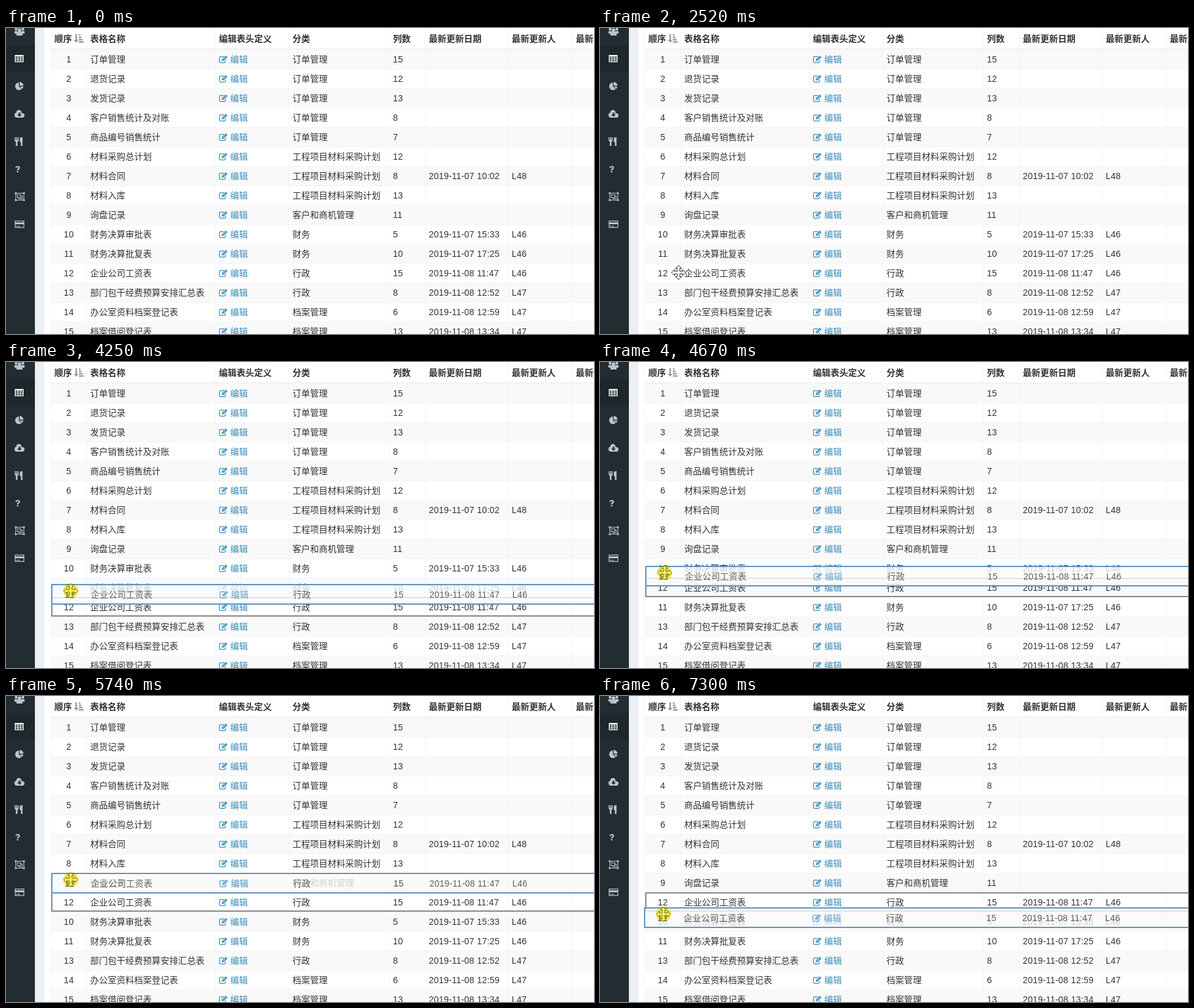
Animation of 936 by 488 pixels, one loop 8 s. Source, as an HTML page with a canvas:

```html
<!DOCTYPE html>
<html lang="zh">
<head>
<meta charset="utf-8">
<style>
html, body { margin: 0; width: 100%; height: 100%; overflow: hidden; background: #fff; }
canvas { display: block; }
</style>
</head>
<body>
<canvas id="stage" width="936" height="488"></canvas>
<script>
const c = document.getElementById('stage').getContext('2d');
const FONT = '"Liberation Sans", "Noto Sans CJK SC", "Noto Sans CJK", sans-serif';
const LOOP = 8000, TOP = 34, ROW = 31;
const COLS = [71, 128, 333, 450, 610, 667, 799, 901];
const HEADS = ['顺序', '表格名称', '编辑表头定义', '分类', '列数', '最新更新日期', '最新更新人', '最新更新'];
const ROWS = `订单管理|订单管理|15
退货记录|订单管理|12
发货记录|订单管理|13
客户销售统计及对账|订单管理|8
商品编号销售统计|订单管理|7
材料采购总计划|工程项目材料采购计划|12
材料合同|工程项目材料采购计划|8|2019-11-07 10:02|L48
材料入库|工程项目材料采购计划|13
询盘记录|客户和商机管理|11
财务决算审批表|财务|5|2019-11-07 15:33|L46
财务决算批复表|财务|10|2019-11-07 17:25|L46
企业公司工资表|行政|15|2019-11-08 11:47|L46
部门包干经费预算安排汇总表|行政|8|2019-11-08 12:52|L47
办公室资料档案登记表|档案管理|6|2019-11-08 12:59|L47
档案借阅登记表|档案管理|13|2019-11-08 13:34|L47`
  .split('\n').map((line, i) => [String(i + 1), ...line.split('|')]);
const DRAGGED = 11;

// Pointer moves: start, end, steps, x, y, how far the dragged row lags
const MOVES = [
  [500, 500, 1, 831, 482], [580, 880, 5, 400, 325], [960, 1280, 5, 122, 390],
  [1360, 1440, 2, 105, 395], [1740, 1840, 2, 99, 389], [2440, 2520, 2, 125, 390],
  [2840, 2940, 2, 103, 392], [3550, 4250, 10, 103, 365], [4340, 4340, 1, 103, 359],
  [4430, 5060, 9, 103, 308], [5120, 5190, 2, 103, 301], [5290, 5290, 1, 103, 302],
  [5600, 5830, 4, 103, 284], [6280, 6460, 3, 103, 321, 8], [6540, 6680, 3, 103, 323],
  [7240, 7300, 2, 101, 348]
];

function pointerAt(t) {
  let x = 831, y = 482, lag = 0;
  for (const [a, b, n, tx, ty, tl = 0] of MOVES) {
    if (t < a) break;
    const k = Math.min(1, (1 + Math.floor((t - a) / (b - a || 1) * (n - 1))) / n);
    x += (tx - x) * k;
    y += (ty - y) * k;
    lag += (tl - lag) * k;
  }
  return { x: Math.round(x), y: Math.round(y), lag: Math.round(lag) };
}

function rect(color, x, y, w, h) {
  c.fillStyle = color;
  c.fillRect(x, y, w, h);
}

function text(s, x, y, color = '#333', weight = '', align = 'left') {
  c.font = `${weight} 14px ${FONT}`;
  c.letterSpacing = /^[ -~]+$/.test(s) ? '0.2px' : '0px';
  c.textAlign = align;
  c.fillStyle = color;
  c.fillText(s, x, y + 5);
}

function path(d, color, width) {
  const p = new Path2D(d);
  if (width) {
    c.strokeStyle = color;
    c.lineWidth = width;
    c.stroke(p);
  } else {
    c.fillStyle = color;
    c.fill(p);
  }
}

function at(x, y, draw) {
  c.save();
  c.translate(x, y);
  draw();
  c.restore();
}

function disc(x, y, r, color) {
  c.beginPath();
  c.arc(x, y, r, 0, 7);
  c.fillStyle = color;
  c.fill();
}

function editIcon(x, y) {
  at(x, y, () => {
    path('M8 -4.3H2.5Q.8 -4.3 .8 -2.5V3.5Q.8 5.3 2.5 5.3H8.5Q10.3 5.3 10.3 3.5V1.5', '#3c8dbc', 1.3);
    path('M4.5 2.5V0L10.8 -6L13.6 -3.3L7.2 2.5Z', '#3c8dbc');
    path('M6.3 .6L10.8 -3.6', '#fff', .8);
  });
}

function cells(row, dx, y) {
  text(row[0], 100 + dx, y, '#333', '', 'center');
  text(row[1], 134 + dx, y);
  editIcon(339 + dx, y);
  text('编辑', 357 + dx, y, '#3c8dbc');
  row.slice(2).forEach((s, i) => text(s, COLS[i + 3] + 6 + dx, y));
}

function sidebar() {
  const ink = '#b8c7ce', dark = '#222d32';
  rect(dark, 0, 0, 46, 488);
  rect('#1e282c', 0, 27, 46, 44);
  at(21.5, 5, () => {
    for (const s of [-1, 1]) {
      disc(s * 5.3, -3, 2.3, ink);
      path(`M${s * 2} 4V0H${s * 8}V4Z`, ink);
    }
    disc(0, -1.5, 3.6, dark);
    disc(0, -1.5, 3, ink);
    path('M-5 7Q-5 1 -2 1H2Q5 1 5 7Z', ink);
  });
  at(14, 43, () => {
    rect('#fff', 0, 0, 14, 11.5);
    for (let i = 0; i < 9; i++)
      rect('#1e282c', 1.2 + i % 3 * 4.2, 2.5 + Math.floor(i / 3) * 2.9, 3.2, 1.9);
  });
  at(20.5, 93, () => {
    path('M0 0V-6A6 6 0 1 0 4.3 4.3Z', ink);
    path('M1.3 -1V-7A6 6 0 0 1 7.3 -1Z', ink);
    path('M1.5 .3H7Q7 2.7 5.3 4.2Z', ink);
  });
  at(21.5, 137, () => {
    disc(-4, 2, 4, ink);
    disc(-1, -2, 4.2, ink);
    disc(4.3, 2.3, 3.6, ink);
    rect(ink, -4, 0, 8, 6);
    path('M-1.3 -2H1.3V1H3.6L0 4.6L-3.6 1H-1.3Z', dark);
  });
  at(20, 181, () => {
    path('M-5.5 -7V-2M-3 -7V-2M-.5 -7V-2', ink, 1.5);
    path('M-6.2 -2.5H.2Q0 0 -1.7 .5V7H-4.3V.5Q-6 0 -6.2 -2.5Z', ink);
    path('M2 1V-4Q2 -7 6.3 -7V7H3.7V1Z', ink);
  });
  at(18.5, 225, () => {
    path('M-2.8 -2Q-2 -4 0 -4Q2.7 -4 2.7 -2Q2.7 -.8 .8 .2Q0 .7 0 2', ink, 2.2);
    rect(ink, -1.2, 3, 2.4, 2.3);
  });
  at(22, 269, () => {
    path('M-6.5 -5.5H6.5V5.5H-6.5Z', ink, 1);
    path('M-4 -3H1.5V1.5H-4ZM-1.5 1.5V3.5H4V-1H1.5', ink, 1.1);
    for (const x of [-8, 5]) for (const y of [-7, 4]) {
      rect(ink, x, y, 3, 3);
      rect(dark, x + 1, y + 1, 1, 1);
    }
  });
  at(21.5, 313, () => {
    path('M-7 -5.2H7V5.2H-7Z', ink, 1.2);
    rect(ink, -7, -3, 14, 3);
    rect(ink, -5.5, 2.5, 2, 1.2);
    rect(ink, -2.5, 2.5, 3, 1.2);
  });
}

function header() {
  HEADS.forEach((s, i) => text(s, COLS[i] + 6, 17, '#333', 'bold'));
  path('M110.5 10H113V19H115.5L111.7 23.5L108 19H110.5Z', '#999');
  for (let i = 0; i < 4; i++) rect('#999', 116, 10 + i * 3.7, 2.5 + i * 1.7, 2.4);
}

function grid() {
  rect('#f4f4f4', 71, 32, 865, 2);
  for (const x of COLS) rect('#f4f4f4', x, 0, 1, 488);
}

function table(order) {
  order.forEach((_, i) => {
    const y = TOP + i * ROW;
    if (i % 2 === 0) rect('#f9f9f9', 71, y, 865, ROW);
    rect('#f4f4f4', 71, y, 865, 1);
  });
  grid();
  header();
  order.forEach((row, i) => cells(row, 0, TOP + i * ROW + 16));
}

function frame(color, x, y, h) {
  c.strokeStyle = color;
  c.lineWidth = 2;
  c.strokeRect(x + 1, y + 1, 900, h - 2);
}

function dragRow(x, y) {
  c.save();
  c.globalAlpha = .78;
  rect('#fcfcfc', x, y, 900, 33);
  cells(ROWS[DRAGGED], x - 71, y + 17);
  c.restore();
  frame('#5a94c3', x, y, 33);
}

function pointer({ x, y }, pressed) {
  at(x, y, () => {
    c.beginPath();
    for (let i = 0; i < 4; i++) {
      for (const [px, py] of [[-2, -2], [-2, -6.5], [-4.8, -6.5], [0, -11.3], [4.8, -6.5], [2, -6.5]])
        c.lineTo(px, py);
      c.rotate(Math.PI / 2);
    }
    c.closePath();
    c.fillStyle = '#fff';
    c.fill();
    c.strokeStyle = pressed ? '#7d7638' : '#222';
    c.lineWidth = 1;
    c.stroke();
    if (pressed) {
      c.globalCompositeOperation = 'multiply';
      disc(0, 0, 12, '#f6ee5c');
    }
  });
}

// The gap follows once the dragged row fully passes its neighbour
function gapIndex(t, y) {
  return t < 6000
    ? Math.min(DRAGGED, Math.floor((y - TOP) / ROW) + 1)
    : Math.max(8, Math.floor((y - 4) / ROW) - 1);
}

function draw(t) {
  const p = pointerAt(t), dragging = t >= 3400;
  const y = p.y - 11 - p.lag;
  const gap = dragging ? gapIndex(t, y) : DRAGGED;
  const order = ROWS.filter((_, i) => i !== DRAGGED);
  order.splice(gap, 0, ROWS[DRAGGED]);

  rect('#fff', 0, 0, 936, 488);
  rect('#ecf0f5', 46, 0, 15, 488);
  sidebar();
  table(order);
  if (dragging) {
    frame('#888', 72, TOP + gap * ROW, ROW);
    dragRow(p.x - 31, y);
  }
  if (t >= 500) pointer(p, t >= 3240);
}

const start = performance.now();
function tick() {
  draw((performance.now() - start) % LOOP);
  requestAnimationFrame(tick);
}
tick();
</script>
</body>
</html>
```
